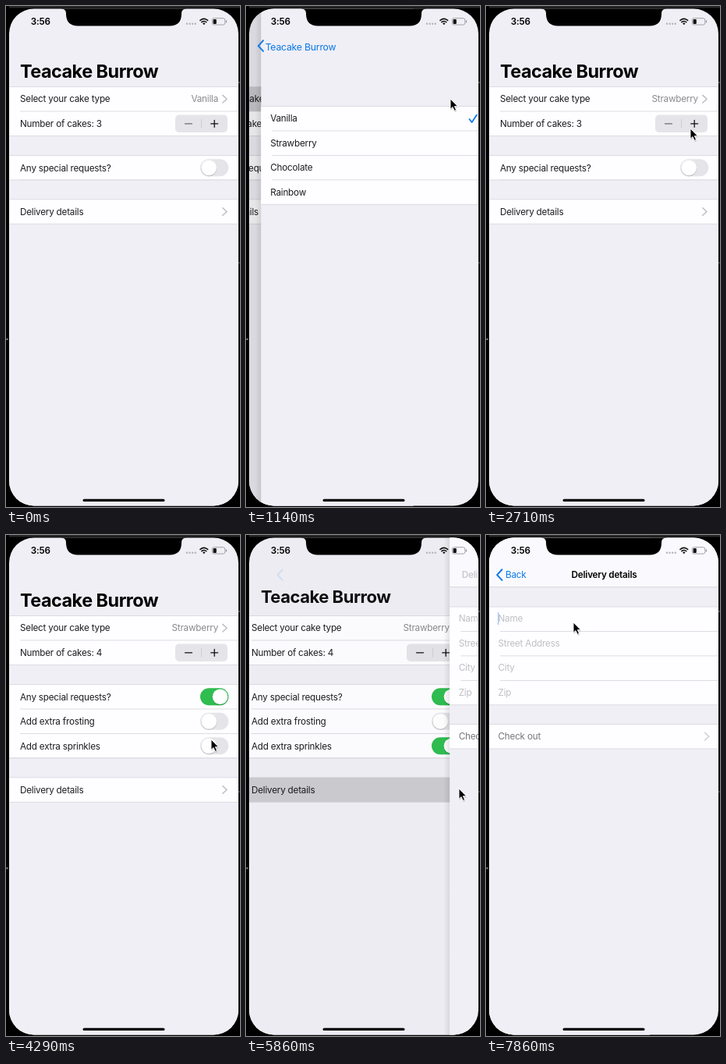
These frames come from a looping animation (300x642 px, 8000 ms). An HTML page:

```html
<!DOCTYPE html>
<html lang="en">
<head>
<meta charset="utf-8">
<title>Cake order</title>
<style>
  html, body { margin: 0; width: 100%; height: 100%; overflow: hidden; background: #000; }
  svg { display: block; width: 300px; height: 642px; }
  text { font: 400 11.7px Inter, sans-serif; letter-spacing: -.21px; fill: #1c1c1e; white-space: pre; }
  text.large { font-size: 23.4px; font-weight: 700; letter-spacing: -.5px; fill: #000; }
  text.bold { font-weight: 600; fill: #000; }
  text.value { fill: #8a8a8e; }
  text.hint { fill: #bfbfc4; }
  text.link { fill: #0a78e8; }
  .stroke { fill: none; stroke-linecap: round; stroke-linejoin: round; }
</style>
</head>
<body>
<svg id="stage" viewBox="0 0 300 642"></svg>
<script>
const SHOP = 'Teacake Burrow';
const BG = '#f0eff6', LINE = '#d6d5dc', BLUE = '#0a78e8';
const LOOP_FRAMES = 56, FPS = 7, ROW = 31.45;

// ---- markup helpers ----
const rect = (x, y, w, h, fill, more = '') =>
  `<rect x="${x}" y="${y}" width="${w}" height="${h}" fill="${fill}" ${more}/>`;
const text = (x, y, s, cls = '', more = '') =>
  `<text x="${x}" y="${y}" class="${cls}" ${more}>${s}</text>`;
const stroke = (d, color, width, more = '') =>
  `<path class="stroke" d="${d}" stroke="${color}" stroke-width="${width}" ${more}/>`;
const line = (y, x = 4) => rect(x, y - .4, 298 - x, .8, LINE);
const label = (row, s, cls, x = 18) => text(x, row + 4.2, s, cls);
const chevron = (x, y, color) => stroke(`M${x} ${y - 4.8}l5.3 4.8l-5.3 4.8`, color, 1.5);

function section(y, count, inset = 18) {
  let s = rect(4, y, 294, ROW * count, '#fefdff') + line(y) + line(y + ROW * count);
  for (let i = 1; i < count; i++) s += line(y + ROW * i, inset);
  return s;
}

const toggle = (id, y) => `<g id="${id}">
  ${rect(249, y - 11, 36.3, 22, '#e5e4e8', 'rx="11"')}
  ${rect(249, y - 11, 36.3, 22, '#2fbd50', 'rx="11" class="on"')}
  <g class="knob"><circle cx="260.2" cy="${y + 1}" r="10.2" fill="#000" opacity=".13"/>
  <circle cx="260.2" cy="${y}" r="9.8" fill="#fff"/></g></g>`;

// ---- pages ----
const home = `<g id="home">
  ${rect(4, 3, 294, 640, BG)}
  ${section(103.5, 2)}
  ${rect(4, 103.5, 294, ROW, '#cbcbd0', 'id="hitType"')}
  ${label(119.2, 'Select your cake type')}
  ${text(272, 123.4, 'Vanilla', 'value', 'id="type" text-anchor="end"')}
  ${chevron(277.8, 119.2, '#bdbdc2')}
  ${label(150.8, 'Number of cakes: <tspan id="count">3</tspan>')}
  ${rect(217, 139.6, 67, 22.4, '#e5e4e9', 'rx="5"')}
  ${rect(251, 139.6, 33, 22.4, '#cfced4', 'rx="5" id="press"')}
  ${rect(250.1, 145, .8, 11.5, '#c9c8ce')}
  ${stroke('M229.5 150.8h9', '#111', 1.3, 'id="minus"')}
  ${stroke('M262.7 150.8h9M267.2 146.3v9', '#111', 1.3)}
  ${section(191.5, 3)}
  ${label(207.3, 'Any special requests?')}${toggle('special', 207.3)}
  <g id="extras">
    ${label(238.8, 'Add extra frosting')}${toggle('frosting', 238.8)}
    ${label(270.3, 'Add extra sprinkles')}${toggle('sprinkles', 270.3)}
  </g>
  <g id="below">
    ${rect(4, 223, 294, 480, BG)}${line(223)}
    ${section(247.8, 1)}
    ${rect(4, 247.8, 294, ROW, '#cbcbd0', 'id="hitDelivery"')}
    ${label(263.5, 'Delivery details')}${chevron(277.8, 263.5, '#bdbdc2')}
  </g>
</g>`;

const edge = rect(-4, 3, 8, 640, 'url(#shade)');

const picker = `<g id="picker">${edge}
  ${rect(4, 3, 294, 640, BG)}
  ${section(128.5, 4)}
  ${rect(4, 128.5 + ROW, 294, ROW, '#cbcbd0', 'id="hitBerry"')}
  ${['Vanilla', 'Strawberry', 'Chocolate', 'Rainbow']
    .map((s, i) => label(144.2 + ROW * i, s, '', 15.8)).join('')}
  ${stroke('M271 145l3.2 4l6.3 -9.4', BLUE, 1.8, 'id="check"')}
</g>`;

const form = `<g id="form">${edge}
  ${rect(4, 3, 294, 640, BG)}
  ${rect(4, 3, 294, 64, '#faf9fd')}${rect(4, 66.4, 294, .8, '#cfced4')}
  ${section(92, 4)}
  ${['Name', 'Street Address', 'City', 'Zip']
    .map((s, i) => label(107 + ROW * i, s, 'hint', 15.5)).join('')}
  ${rect(15, 99, 1.6, 16, '#3f7fe8', 'id="caret"')}
  ${section(242.5, 1)}
  ${text(15.5, 262.4, 'Check out', '', 'style="fill:#77767b"')}${chevron(280.6, 258.2, '#cfced3')}
</g>`;

const statusBar = `
  <path d="M71 0V3.6Q77 4 77 9.5V11Q77.5 25.4 92 25.4H210Q224.500 25.400 225 11V9.500Q225 4 231 3.600V0Z"/>
  ${text(31.8, 24.2, '3:56', 'bold')}
  ${[232, 235.6, 239.2, 242.8].map(x => `<circle cx="${x}" cy="22.7" r="1.2" fill="#b5b4ba"/>`).join('')}
  ${stroke('M249 18.400Q253.800 14.200 258.600 18.400M250.900 20.700Q253.800 18.300 256.700 20.700', '#111', 1.6)}
  <path d="M252.100 22.200Q253.800 20.900 255.500 22.200L253.800 24.200Z" fill="#111"/>
  ${rect(264.4, 15.700, 16.400, 8.400, 'none', 'rx="2.4" stroke="#99989e" stroke-width=".9"')}
  ${rect(265.600, 16.900, 4.200, 6, '#111', 'rx="1"')}
  ${rect(281.800, 18.300, 1.300, 3.200, '#99989e', 'rx=".6"')}
  ${rect(98.500, 631.700, 105, 3.400, '#000', 'rx="1.7"')}`;

const stage = document.getElementById('stage');
stage.innerHTML = `
  <defs>
    <clipPath id="screen"><rect x="4" y="3.5" width="294" height="637" rx="32"/></clipPath>
    <linearGradient id="shade"><stop stop-color="#000" stop-opacity="0"/>
      <stop offset="1" stop-color="#000" stop-opacity=".09"/></linearGradient>
  </defs>
  ${rect(0, 0, 300, 642, '#000')}${rect(4, 0, 296, 2.500, '#262626')}
  <circle cx="1.5" cy="427" r="1.3" fill="#777"/>
  <circle cx="299" cy="98" r="1.1" fill="#555"/><circle cx="299" cy="329" r="1.1" fill="#444"/>
  <g clip-path="url(#screen)">
    ${home}
    ${rect(4, 3, 294, 640, '#000', 'id="dim"')}
    ${picker}${form}
    ${text(0, 0, SHOP, 'large', 'id="title"')}
    ${text(0, 0, SHOP, 'link', 'id="back"')}
    ${stroke('M20.500 44.300l-6.300 6.800l6.300 6.800', BLUE, 2, 'id="arrow"')}
    ${text(0, 55.200, 'Delivery details', 'bold', 'id="formTitle" text-anchor="middle"')}
    ${statusBar}
  </g>
  <g id="cursor">
    <path d="M.6 1.500V14.700L3.600 12L5.800 17L8 16L5.800 11.200H10Z" opacity=".2"/>
    <path d="M0 0V13.200L3 10.500L5.200 15.300L7.500 14.300L5.300 9.600H9.400Z" stroke="#fff" stroke-width=".9"/>
  </g>`;

const el = {};
stage.querySelectorAll('[id]').forEach(n => el[n.id] = n);
const set = (n, attrs) => { for (const k in attrs) n.setAttribute(k, attrs[k]); };
const fade = (n, o) => set(n, { opacity: Math.max(0, Math.min(1, o)) });

// ---- motion ----
// Pointer stops: time, x, y
const PATH = [
  [140, 284, 290], [710, 262, 119], [1150, 262, 119], [1710, 196, 171],
  [2150, 196, 171], [2710, 262, 157], [3140, 262, 157], [3430, 264, 206],
  [3860, 264, 206], [4280, 263, 262], [4860, 263, 262], [5290, 273, 325],
  [6150, 273, 325], [6430, 157, 150], [6710, 118, 24], [7000, 112, 112]
];
// Caret steps: time, opacity
const CARET = [[0, 0], [6990, 1], [7280, 0], [7705, .15], [7850, .4]];

function pointer(t) {
  const i = PATH.findIndex(p => p[0] > t);
  if (i < 0) return PATH[PATH.length - 1];
  const [t0, x0, y0] = PATH[Math.max(0, i - 1)], [t1, x1, y1] = PATH[i];
  const u = Math.max(0, Math.min(1, (t - t0) / (t1 - t0 || 1))), e = u * u * (3 - 2 * u);
  return [t, x0 + (x1 - x0) * e, y0 + (y1 - y0) * e];
}

// What is left of a critically damped spring released at `start`
function left(t, start) {
  const x = Math.max(0, t - start) * .0184;
  return (1 + x) * Math.exp(-x);
}

function setToggle(n, v) {
  fade(n.querySelector('.on'), v);
  set(n.querySelector('.knob'), { transform: `translate(${14.300 * v})` });
}

function slide(n, rest) {
  set(n, { transform: `translate(${294 * rest})`, visibility: rest < .998 ? 'visible' : 'hidden' });
}

function draw(t) {
  const pick = t < 2130 ? left(t, 888) : 1 - left(t, 2130);
  const deliver = left(t, 5824);
  const rest = Math.min(pick, deliver);
  const grow = 1 - left(t, 3560);

  // Home screen
  set(el.home, { transform: `translate(${-88 * (1 - rest)})` });
  fade(el.dim, .1 * (1 - rest));
  fade(el.hitType, t < 850 ? 0 : t < 2130 ? 1 : left(t, 2300));
  fade(el.hitDelivery, t < 5420 ? 0 : 1);
  el.type.textContent = t < 1990 ? 'Vanilla' : 'Strawberry';
  el.count.textContent = t < 2990 ? 3 : 4;
  fade(el.press, t > 2850 && t < 3130 ? 1 : 0);
  set(el.minus, { stroke: t < 2990 ? '#6d6c72' : '#111' });
  setToggle(el.special, grow);
  setToggle(el.frosting, 0);
  setToggle(el.sprinkles, 1 - left(t, 4540));
  fade(el.extras, grow);
  set(el.below, { transform: `translate(0 ${63 * grow})` });

  // Pushed screens
  slide(el.picker, pick);
  slide(el.form, deliver);
  fade(el.hitBerry, t < 1990 ? 0 : 1);
  set(el.check, { transform: `translate(0 ${t < 2130 ? 0 : ROW})` });
  const step = CARET.filter(c => c[0] <= t).pop();
  fade(el.caret, step[1]);

  // The large title shrinks into the back label
  const x = 25 - 7 * rest, y = 55.200 + 36.900 * rest, size = 1 + .92 * rest;
  set(el.title, { transform: `translate(${x} ${y}) scale(${size / 1.92})` });
  set(el.back, { transform: `translate(${x} ${y}) scale(${size})` });
  el.back.textContent = t < 4000 ? SHOP : 'Back';
  fade(el.title, (rest - .25) * 1.5);
  fade(el.back, 1.080 - 1.600 * rest);
  if (rest > .99) fade(el.back, 0);
  set(el.arrow, { transform: `translate(${30 * rest})` });
  fade(el.arrow, 1 - rest);
  set(el.formTitle, { x: 151.500 + 203 * Math.pow(deliver, 1.450) });
  fade(el.formTitle, 1.500 * (1 - deliver));

  const [, px, py] = pointer(t);
  set(el.cursor, {
    transform: `translate(${px} ${py})`,
    visibility: t < 140 ? 'hidden' : 'visible'
  });
}

const begin = performance.now();
function tick() {
  const ms = performance.now() - begin;
  const n = Math.floor((ms + 5) * FPS / 1000) % LOOP_FRAMES;
  draw(n * 1000 / FPS);
  requestAnimationFrame(tick);
}
tick();
</script>
</body>
</html>
```
